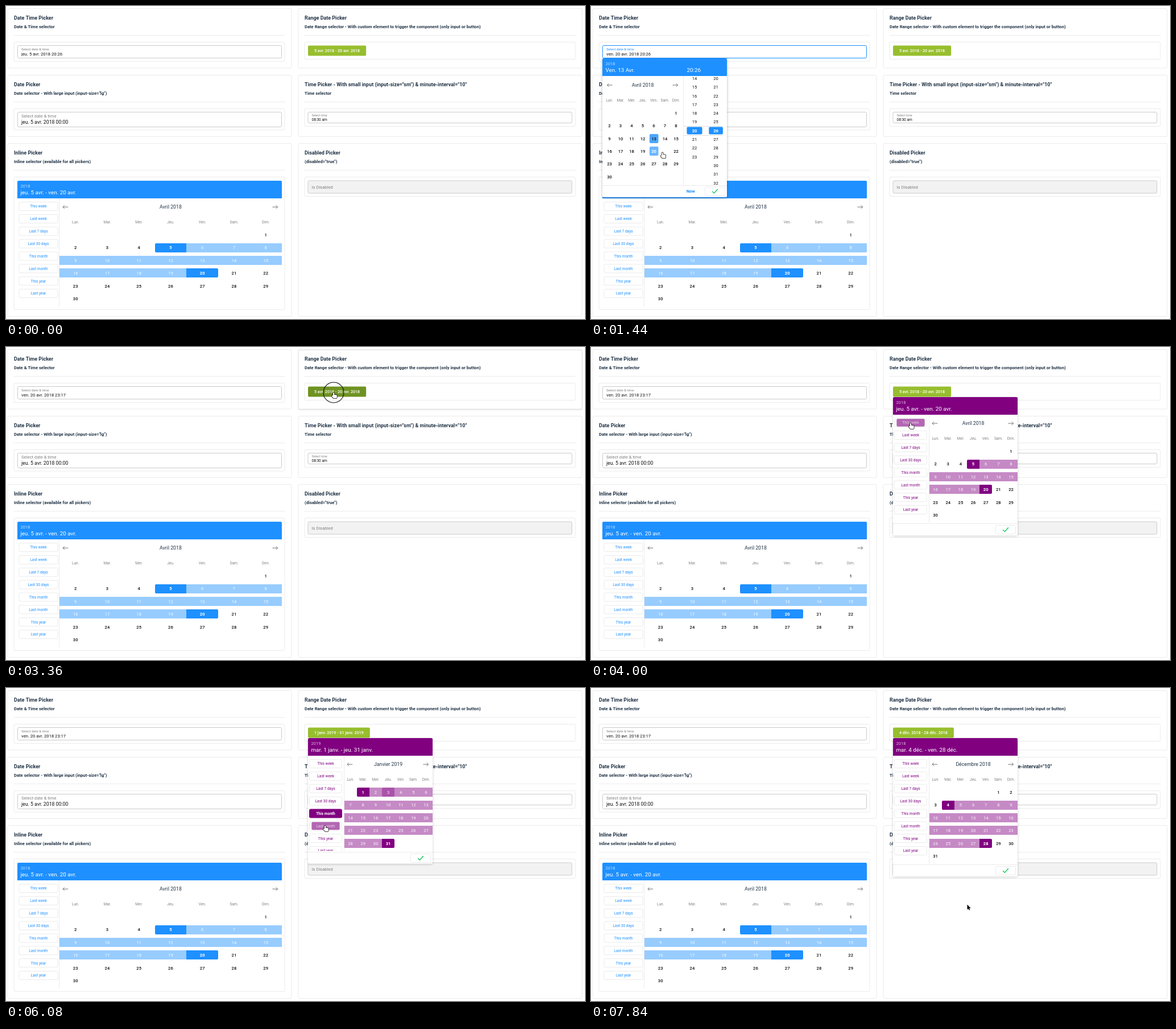
Write an HTML page with a canvas that moves like this. It is 1018 px wide and 550 px high and loops after 8 s.

```html
<!DOCTYPE html>
<html lang="en">
<head>
<meta charset="utf-8">
<title>Date pickers</title>
<style>
html, body { margin: 0; width: 100%; height: 100%; overflow: hidden; background: #fff; }
canvas { display: block; width: 1018px; height: 550px; font-family: Roboto, sans-serif; }
</style>
</head>
<body>
<canvas id="stage"></canvas>
<script>
const W = 1018, H = 550, LOOP = 8000, STEP = 160, SCALE = 0.546;
const ROW = 22.4, ITEM = 15.3, BUTTON = 21.87;
const canvas = document.getElementById('stage');
const ctx = canvas.getContext('2d');
const ratio = window.devicePixelRatio || 1;
canvas.width = W * ratio;
canvas.height = H * ratio;

const BLUE = '30,144,255', PURPLE = '128,0,128';
const NAVY = '#213346', INK = '#111', GREY = '#808080', EDGE = '#ebebeb';
const tint = (rgb, a = 1) => `rgba(${rgb},${a})`;

const words = s => s.split(' ');
const MONTHS = words('Janvier Février Mars Avril Mai Juin Juillet Août Septembre Octobre Novembre Décembre');
const SHORT = words('janv. févr. mars avr. mai juin juil. août sept. oct. nov. déc.');
const WEEK = words('Lun. Mar. Mer. Jeu. Ven. Sam. Dim.');
const SHORTCUTS = ['This week', 'Last week', 'Last 7 days', 'Last 30 days',
  'This month', 'Last month', 'This year', 'Last year'];

// Dates
const april = d => new Date(2018, 3, d);
const december = d => new Date(2018, 11, d);
const TODAY = new Date(2019, 0, 3);
const plus = (d, n) => new Date(d.getFullYear(), d.getMonth(), d.getDate() + n);
const weekday = d => (d.getDay() + 6) % 7;
const dayMonth = d => `${d.getDate()} ${SHORT[d.getMonth()]}`;
const withYear = d => `${dayMonth(d)} ${d.getFullYear()}`;
const withWeekday = d => `${WEEK[weekday(d)].toLowerCase()} ${dayMonth(d)}`;
const span = (s, format) => s.to ? `${format(s.from)} - ${format(s.to)}` : format(s.from);

function wholeMonth(offset) {
  const y = TODAY.getFullYear(), m = TODAY.getMonth() + offset;
  return [new Date(y, m, 1), new Date(y, m + 1, 0)];
}

const PRESETS = [
  [plus(TODAY, -weekday(TODAY)), plus(TODAY, 6 - weekday(TODAY))],
  [TODAY, TODAY],
  [plus(TODAY, -6), TODAY],
  [plus(TODAY, -29), TODAY],
  wholeMonth(0),
  wholeMonth(-1)
];

// Calendar layouts: centre of the first cell, column step, arrow positions
const DATE_GRID = { x: 32.5, y: 188, dx: 19.5, arrows: [33, 148], rgb: BLUE, square: true };
const RANGE_GRID = { x: 605.6, y: 183.2, dx: 22.15, arrows: [604.6, 738], rgb: PURPLE };
const INLINE_GRID = { x: 122.2, y: 402.2, dx: 55.75, arrows: [104.6, 473], rgb: BLUE };

function spot(grid, date) {
  const slot = weekday(new Date(date.getFullYear(), date.getMonth(), 1)) + date.getDate() - 1;
  return [grid.x + slot % 7 * grid.dx, grid.y + Math.floor(slot / 7) * ROW];
}

// Each gesture ends at a place on a given step; its effect shows one step later
const gesture = (step, [x, y], effect) => ({ step, x, y, effect });
const GESTURES = [
  gesture(1, [650, 45]),
  gesture(4, [240, 84], { popup: 'time' }),
  gesture(6, spot(DATE_GRID, april(13)), { date: april(13) }),
  gesture(8, spot(DATE_GRID, april(20)), { date: april(20) }),
  gesture(11, [182, 219 + 3 * ITEM], { hour: 23 }),
  gesture(16, [219.5, 241], { minute: 17 }),
  gesture(18, [218, 325], { popup: null }),
  gesture(21, [576, 80], { popup: 'range' }),
  ...PRESETS.map(([from, to], i) =>
    gesture(26 + Math.floor(i * 2.6), [561, 137 + i * BUTTON], { from, to, active: i })),
  gesture(43, spot(RANGE_GRID, december(4)), { from: december(4), to: null, active: -1 }),
  gesture(46, spot(RANGE_GRID, december(28)), { to: december(28) }),
  gesture(49, [661.5, 380.5])
];
const START = { popup: null, date: april(5), hour: 20, minute: 26,
  from: april(5), to: april(20), active: -1, since: -9 };

function stateAt(step) {
  const done = GESTURES.filter(g => g.effect && g.step < step);
  return done.reduce((s, g) => ({ ...s, ...g.effect, since: g.step + 1 }), START);
}

const smooth = p => p * p * p * (p * (p * 6 - 15) + 10);

function cursorAt(step) {
  const i = GESTURES.findIndex(g => g.step >= step);
  const b = GESTURES[i], a = GESTURES[i - 1];
  if (!a) return b.step === step ? [b.x, b.y] : [-99, -99];
  const p = smooth((step - a.step) / (b.step - a.step));
  return [a.x + (b.x - a.x) * p, a.y + (b.y - a.y) * p];
}

function inside(step, x, y, w, h) {
  const [cx, cy] = cursorAt(step);
  return cx >= x && cx < x + w && cy >= y && cy < y + h;
}

// y is the optical centre of the capitals
function text(s, x, y, px, color = INK, weight = 400, align = 'left') {
  const size = px * SCALE;
  ctx.font = `${weight} ${size}px Roboto, sans-serif`;
  ctx.textAlign = align;
  ctx.fillStyle = color;
  ctx.fillText(s, x, y + size * 0.355);
}
const label = (s, x, y, px, color, weight) => text(s, x, y, px, color, weight, 'center');

function box(x, y, w, h, fill, edge, r = 2) {
  const inset = edge ? 0.5 : 0;
  ctx.beginPath();
  ctx.roundRect(x + inset, y + inset, w - 2 * inset, h - 2 * inset, r);
  if (fill) { ctx.fillStyle = fill; ctx.fill(); }
  if (edge) { ctx.strokeStyle = edge; ctx.lineWidth = 1; ctx.stroke(); }
}

function rect(x, y, w, h, color) {
  ctx.fillStyle = color;
  ctx.fillRect(x, y, w, h);
}

function stroke(points, color, width) {
  ctx.beginPath();
  points.forEach(([x, y]) => ctx.lineTo(x, y));
  ctx.strokeStyle = color;
  ctx.lineWidth = width;
  ctx.stroke();
}

function clipped(x, y, w, h, draw) {
  ctx.save();
  ctx.beginPath();
  ctx.rect(x, y, w, h);
  ctx.clip();
  draw();
  ctx.restore();
}

function panel(x, y, w, h, edge, shade, blur) {
  ctx.save();
  ctx.shadowColor = `rgba(0,0,0,${shade})`;
  ctx.shadowBlur = blur * ratio;
  ctx.shadowOffsetY = ratio;
  box(x, y, w, h, '#fff', edge);
  ctx.restore();
}

function arrow(x, y, dir) {
  const tip = x + 4.6 * dir, back = tip - 3 * dir;
  stroke([[x - 4.6 * dir, y], [tip, y]], '#555', 0.8);
  stroke([[back, y - 3], [tip, y], [back, y + 3]], '#555', 0.8);
}

function card(x, y, h, title, subtitle, innerH, raised) {
  panel(x, y, 500, h, EDGE, raised ? 0.12 : 0, 2);
  text(title, x + 11.5, y + 16.7, 16.4, NAVY, 700);
  text(subtitle, x + 11.5, y + 32.5, 14, NAVY, 700);
  rect(x + 11, y + 47, 477, 1, EDGE);
  box(x + 11, y + 59, 477, innerH, null, EDGE);
}

function field(x, y, h, name, value, px, namePx, focused) {
  box(x, y, 465, h, '#fff', focused ? tint(BLUE) : '#cacaca');
  text(name, x + 7, y + h * 0.283, namePx, focused ? tint(BLUE) : GREY);
  text(value, x + 7, y + h * 0.667, px);
}

function heading(x, y, w, rgb, year, title) {
  box(x, y, w, 31, tint(rgb), null, [2, 2, 0, 0]);
  text(year, x + 5.5, y + 9, 14, 'rgba(255,255,255,.7)');
  text(title, x + 5.5, y + 20.3, 18, '#fff');
}

function calendar(grid, shown, from, to, live) {
  const { x, y, dx, rgb, square, arrows } = grid;
  const year = shown.getFullYear(), month = shown.getMonth();
  const { step, old = [], age = 9 } = live || {};
  label(`${MONTHS[month]} ${year}`, x + 3 * dx, y - 49, 16, NAVY);
  arrows.forEach((ax, i) => arrow(ax, y - 49, i ? 1 : -1));
  WEEK.forEach((d, i) => label(d, x + i * dx, y - 22.3, 12, GREY));

  for (let date = new Date(year, month, 1); date.getMonth() === month; date = plus(date, 1)) {
    const [cx, cy] = spot(grid, date);
    const left = square ? cx - 7.6 : Math.round(cx - dx / 2);
    const width = square ? 15.6 : Math.round(cx + dx / 2) - left;
    const top = Math.round(cy - 8);
    const isFrom = +date === +from, isTo = +date === +to;
    const between = to && date > from && date < to;
    const fill = (a, r = 2) => box(left, top, width, 16, tint(rgb, a), null, r);
    let color = INK, weight = 500;
    if (between) {
      fill(0.46, 0);
      color = 'rgba(255,255,255,.9)';
      weight = 400;
    }
    if (isFrom || isTo) {
      const l = isFrom ? 2 : 0, r = isTo ? 2 : 0;
      fill(age ? 1 : 0.65, [l, r, r, l]);
      color = '#fff';
      weight = 700;
    } else if ((between || square) && age < 2 && old.some(d => +d === +date)) {
      fill(age ? 0.4 : 0.8);
    } else if (live && !between && inside(step, left, top, width, 16)) {
      if (inside(step - 1, left, top, width, 16)) fill(0.6);
      color = '#fff';
    }
    label(date.getDate(), cx, cy, 14, color, weight);
  }
}

function shortcuts(x, y, w, rgb, active, step) {
  SHORTCUTS.forEach((name, i) => {
    const cx = x + w / 2, cy = y + i * BUTTON, on = i === active;
    const over = s => inside(s, x, cy - 9, w, 19);
    const hover = step && !on && over(step);
    box(x, cy - 8, w, 16, on ? tint(rgb) : '#fff', on ? tint(rgb) : EDGE);
    if (hover) {
      const g = over(step - 1) ? 1 : 0.85;
      box(cx - w * g / 2, cy - 8 * g, w * g, 16 * g, tint(rgb, 0.6));
    }
    label(name, cx, cy, 12, on ? '#fff' : hover ? 'rgba(255,255,255,.7)' : tint(rgb), on ? 700 : 400);
  });
}

function confirmButton(x, y) {
  box(x - 18, y - 8, 36, 16, '#fff', EDGE);
  stroke([[x - 4.8, y + 0.3], [x - 1.6, y + 3.4], [x + 4.8, y - 3.8]], '#00c851', 1.3);
}

function wheel(x, count, scroll, selected, half, hovered) {
  for (let v = 0; v < count; v++) {
    const y = 219 + (v - scroll) * ITEM;
    let color = INK, weight = 400;
    if (v === selected) {
      box(x - half, y - 6.5, half * 2, 13, tint(BLUE));
      color = '#fff';
      weight = 700;
    } else if (v === hovered) {
      color = tint(BLUE);
      weight = 700;
    } else if (v === hovered + 1) {
      box(x - half, y - 6, half * 2, 12, tint(BLUE, 0.5));
      color = '#fff';
    }
    label(String(v).padStart(2, '0'), x, y, 14, color, weight);
  }
}

function dateTimePopup(step, s, before) {
  const shown = stateAt(step - 1).date;
  const title = `${WEEK[weekday(shown)]} ${shown.getDate()} Avr.`;
  panel(20, 92, 219, 244, null, 0.3, 4);
  heading(20, 92, 219, BLUE, '2018', title);
  text(`${s.hour}:${s.minute}`, 168.5, 112.3, 18, '#fff');
  calendar(DATE_GRID, s.date, s.date, s.date, { step, old: [before.date], age: step - s.since });
  rect(162, 123, 1, 192, EDGE);
  clipped(163, 123, 76, 191, () => {
    const hours = Math.min(23, 20 + 1.5 * Math.max(0, step - 11));
    const minutes = s.minute === START.minute ? 26 - 3.2 * Math.max(0, step - 13) : s.minute;
    const scrolling = minutes < START.minute && s.minute === START.minute;
    const hovered = Math.round(minutes + (cursorAt(step)[1] - 219) / ITEM);
    rect(163, 211, 69, 1, '#dedede');
    rect(163, 227, 69, 1, '#dedede');
    wheel(182, 24, hours, s.hour, 13.5);
    wheel(219.6, 60, minutes, s.minute, 12.3, scrolling ? hovered : NaN);
    if (step > 11 && step < 17) box(202, 254 - (23 - hours) * 6, 4, 64, '#858585');
  });
  rect(20, 315, 219, 1, EDGE);
  label('Now', 175.3, 325.5, 14, tint(BLUE), 700);
  confirmButton(218, 325.5);
}

function rangePopup(step, s, before) {
  const shown = s.to || s.from;
  const lastDay = new Date(shown.getFullYear(), shown.getMonth() + 1, 0);
  const base = spot(RANGE_GRID, lastDay)[1] + 15;
  panel(531, 88, 219, base - 67, null, 0.2, 4);
  heading(531, 88, 219, PURPLE, shown.getFullYear(), span(s, withWeekday));
  clipped(531, 119, 219, base - 120.5, () => {
    shortcuts(533, 133, 58, PURPLE, s.active, step);
    rect(594, 119, 1, base - 119, EDGE);
    calendar(RANGE_GRID, shown, s.from, s.to || s.from,
      { step, old: [before.from, before.to], age: step - s.since });
  });
  rect(531, Math.round(base), 219, 1, EDGE);
  confirmButton(729, Math.round(base) + 11);
}

function rangeButton(step, s) {
  const caption = span(s, withYear), px = 13.1;
  ctx.font = `500 ${px * SCALE}px Roboto, sans-serif`;
  const width = ctx.measureText(caption).width + 22;
  box(531, 69.5, width, 18, inside(step, 531, 69, width, 19) ? '#6f9322' : '#97be2e');
  text(caption, 542, 78.7, px, '#fff', 500);
}

function handShape() {
  const parts = [[-1, 0, 2.3, 8], [-3, 5, 4, 3], [-1, 4, 6.8, 6.3]];
  ctx.beginPath();
  parts.forEach(p => ctx.roundRect(...p, 1.2));
}

function arrowShape() {
  ctx.beginPath();
  [[0, 0], [0, 9], [2, 7.2], [3.3, 10], [4.7, 9.4], [3.5, 6.7], [6.2, 6.5]]
    .forEach(p => ctx.lineTo(...p));
  ctx.closePath();
}

function cursor(step, s) {
  const [x, y] = cursorAt(step);
  const hand = inside(step, 20, 69, 465, 23) || inside(step, 531, 69, 103, 19) ||
    (s.popup === 'time' && inside(step, 20, 92, 219, 244)) ||
    (s.popup === 'range' && inside(step, 531, 88, 219, 244));
  if (GESTURES.some(g => g.effect && g.step === step)) {
    ctx.beginPath();
    ctx.arc(x, y, 18, 0, Math.PI * 2);
    ctx.strokeStyle = INK;
    ctx.lineWidth = 1.1;
    ctx.stroke();
  }
  ctx.save();
  ctx.translate(x, y);
  (hand ? handShape : arrowShape)();
  ctx.fillStyle = hand ? '#fff' : '#000';
  ctx.strokeStyle = hand ? '#000' : '#fff';
  ctx.lineWidth = 1.4;
  ctx.stroke();
  ctx.fill();
  ctx.restore();
}

function cards(raised) {
  const left = 2.5, right = 513.5;
  card(left, 4, 105.5, 'Date Time Picker', 'Date & Time selector', 35);
  card(right, 4, 105.5, 'Range Date Picker',
    'Date Range selector - With custom element to trigger the component (only input or button)', 31, raised);
  card(left, 121, 109, 'Date Picker', 'Date selector - With large input (input-size="lg")', 38.5);
  card(right, 121, 109,
    'Time Picker - With small input (input-size="sm") & minute-interval="10"', 'Time selector', 32);
  card(left, 241, 305, 'Inline Picker', 'Inline selector (available for all pickers)', 234);
  card(right, 241, 305, 'Disabled Picker', '(disabled="true")', 35);
}

function draw(step) {
  const s = stateAt(step), before = stateAt(s.since - 1);
  ctx.setTransform(ratio, 0, 0, ratio, 0, 0);
  rect(0, 0, W, H, '#fff');
  cards(inside(step, 513, 4, 500, 105));

  field(20, 69, 23, 'Select date & time', `${withWeekday(s.date)} 2018 ${s.hour}:${s.minute}`,
    14, 11, s.popup === 'time');
  field(20, 186, 27, 'Select date & time', 'jeu. 5 avr. 2018 00:00', 16, 14);
  field(530.5, 186, 20, 'Select time', '08:30 am', 12, 10);
  box(530.5, 306.5, 465, 23, '#f2f2f2', '#cbcbcb');
  text('Is Disabled', 537.5, 318.2, 14, GREY);
  rangeButton(step, s);

  heading(20, 307, 465, BLUE, '2018', span(START, withWeekday));
  shortcuts(22.5, 352, 69, BLUE, -1);
  rect(93, 338, 1, 190, EDGE);
  calendar(INLINE_GRID, START.to, START.from, START.to);

  if (s.popup === 'time') dateTimePopup(step, s, before);
  if (s.popup === 'range') rangePopup(step, s, before);
  cursor(step, s);
}

function tick(time) {
  draw(Math.floor(time % LOOP / STEP));
  requestAnimationFrame(tick);
}
draw(0);
requestAnimationFrame(tick);
</script>
</body>
</html>
```
